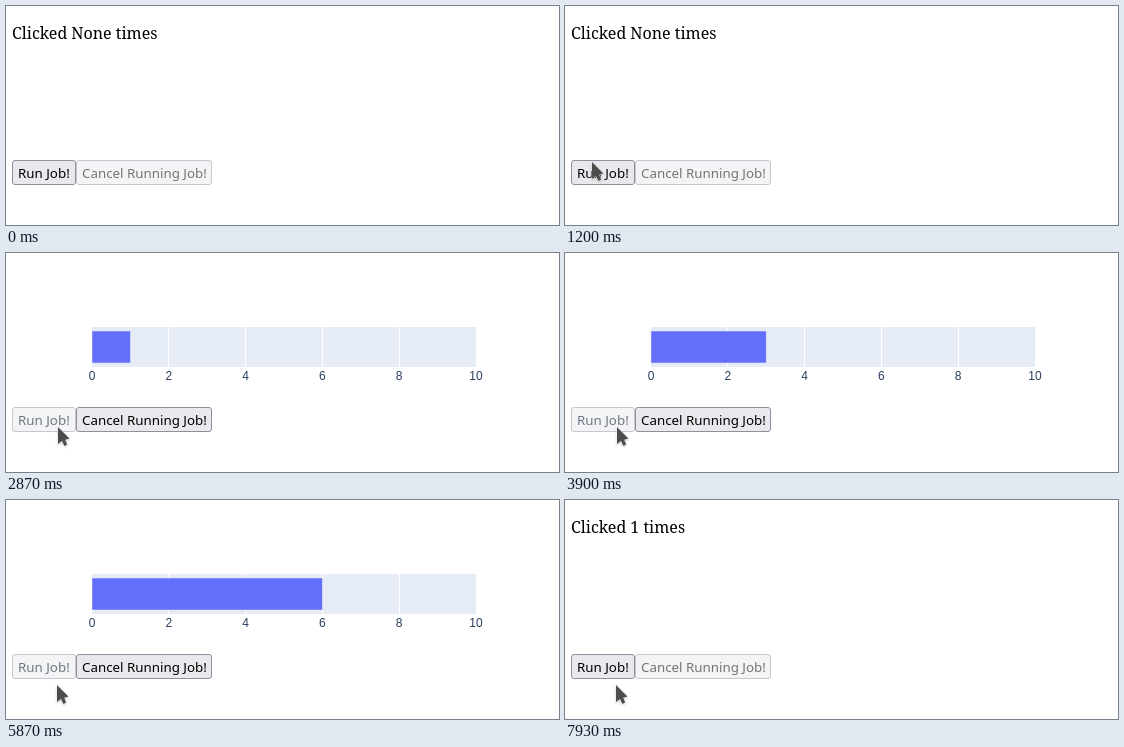
An HTML page for the animation above (8000 ms loop, 553x219 px).

```html
<!DOCTYPE html>
<html lang="en">
<head>
<meta charset="utf-8">
<title>Job progress</title>
<style>
  html, body { margin: 0; width: 100%; height: 100%; overflow: hidden; background: #fff; }
  svg { display: block; }
  #count { font: 16px "Noto Serif", serif; }
  .btn rect { fill: #e9e9ed; stroke: #8f8f9d; }
  .btn text { font: 13.3333px "Noto Sans", sans-serif; }
  .btn.hover rect { fill: #d0d0d7; stroke: #676774; }
  .btn.off rect { fill: #f4f4f6; stroke: #c7c7ce; }
  .btn.off text { fill: #747474; }
  #run.off text { fill: #6c7884; }
  #ticks { font: 12px "Liberation Sans", Arial, sans-serif; fill: #2a3f5f; text-anchor: middle; }
  #cursor { filter: drop-shadow(0 1px 1px rgba(0, 0, 0, .2)); }
</style>
</head>
<body>
<svg width="553" height="219" viewBox="0 0 553 219">
  <text id="count" x="6" y="33"></text>
  <g id="chart">
    <rect x="86" y="74" width="384" height="40" fill="#e5ecf6"/>
    <g id="grid" stroke="#fff"></g>
    <rect id="bar" x="86" y="78" height="32" fill="#636efa" stroke="#e5ecf6" stroke-width=".5"/>
    <g id="ticks"></g>
  </g>
  <g id="run" class="btn">
    <rect x="6.5" y="154.5" width="63" height="24" rx="2.5"/>
    <text x="12" y="172">Run Job!</text>
  </g>
  <g id="cancel" class="btn">
    <rect x="70.5" y="154.5" width="135" height="24" rx="2.5"/>
    <text x="76" y="172">Cancel Running Job!</text>
  </g>
  <path id="cursor" d="M0 0V17L4 14L6.4 19L9.2 17.5L7.2 12.8L11.5 11.5Z"
    fill="#4d4d4d" stroke="#fff" stroke-width=".8" paint-order="stroke" stroke-linejoin="round"/>
</svg>
<script>
const LOOP = 8000, ENTER = 300, HOVER = 1230, START = 1800, END = 7930, UNIT = 38.4;
const polls = [2870, 3900, 4930, 5870, 6830];
const $ = id => document.getElementById(id);

function add(parent, name, attrs, text = "") {
  const el = document.createElementNS("http://www.w3.org/2000/svg", name);
  for (const key in attrs) el.setAttribute(key, attrs[key]);
  el.textContent = text;
  parent.append(el);
}

for (let n = 0; n <= 10; n += 2) {
  const x = 86 + n * UNIT;
  if (n > 0 && n < 10) {
    const line = Math.floor(x) + .5;
    add($("grid"), "line", { x1: line, x2: line, y1: 74, y2: 114 });
  }
  add($("ticks"), "text", { x, y: 127 }, n);
}

// Share of the span from a to b that has passed, 0 to 1
const span = (t, a, b) => Math.min(1, Math.max(0, (t - a) / (b - a)));
const ease = k => k * k * (3 - 2 * k);

// Cubic Bezier curve that starts at 0
const curve = (k, b, c, d) => 3 * k * (1 - k) * ((1 - k) * b + k * c) + k ** 3 * d;

// The pointer swings in from the corner, then makes three small moves
function pointer(t) {
  const enter = span(t, ENTER, 1160);
  const click = ease(span(t, 1210, 1650));
  const nudge = span(t, 2000, 2070);
  const leave = span(t, 5490, 5630);
  const x = curve(enter, 85, 85, 27) + 22 * click + 3 * nudge - leave;
  const y = curve(enter, 20, 110, 156) + 17 * click + nudge + 11 * leave;
  return [Math.round(x), Math.round(y)];
}

// About 1.75 steps finish between two polls
function stepsDone(t) {
  const count = polls.filter(at => t >= at).length;
  return Math.max(0, Math.round(1.75 * count - .75));
}

function show(el, on) {
  el.style.display = on ? "" : "none";
}

function draw(t) {
  const running = t >= START && t < END;
  const done = stepsDone(t);
  show($("count"), !running);
  show($("chart"), running);
  show($("bar"), done > 0);
  show($("cursor"), t >= ENTER);

  $("count").textContent = `Clicked ${t < START ? "None" : 1} times`;
  $("bar").setAttribute("width", done * UNIT);
  $("run").classList.toggle("off", running);
  $("run").classList.toggle("hover", t >= HOVER && t < START);
  $("cancel").classList.toggle("off", !running);
  $("cursor").setAttribute("transform", `translate(${pointer(t)})`);
}

const begin = performance.now();
function tick() {
  draw((performance.now() - begin) % LOOP);
  requestAnimationFrame(tick);
}
tick();
</script>
</body>
</html>
```
